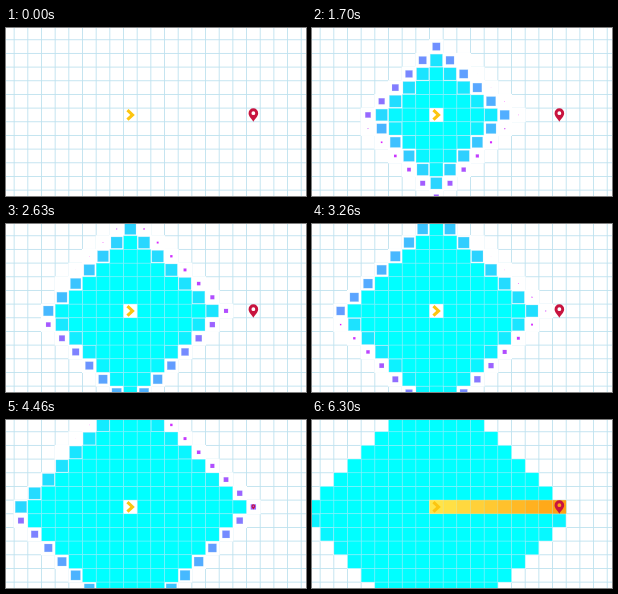
These frames come from a looping animation (300x168 px, 6330 ms). An HTML page with a canvas:

```html
<!DOCTYPE html>
<html lang="en">
<head>
<meta charset="utf-8">
<title>Breadth-first search</title>
<style>
  html, body { margin: 0; width: 100%; height: 100%; overflow: hidden; background: #fff; }
  canvas { display: block; width: 100vw; height: 100vh; }
</style>
</head>
<body>
<canvas id="stage"></canvas>
<script>
const W = 300, H = 168, LOOP = 6330;
const CELL = 13.67, LEFT = 117.5, TOP = 80.1;   // start cell's corner
const GOAL = 9;                                 // goal column, on the start row
const TICK = 31.5, GROW = 1650;
const PATH_START = 5245, PATH_STEP = 50;
const LINE = '#bfe2ef', EDGE = 'rgba(190,230,250,.5)', PATH_EDGE = 'rgba(255,235,190,.25)';
const MAGENTA = [255, 0, 255], CYAN = [0, 255, 255];
const ORANGE = [255, 157, 16], YELLOW = [255, 228, 72];

const canvas = document.getElementById('stage');
const ctx = canvas.getContext('2d');
const arrow = new Path2D('M-2.9-4.8L2.2 0L-2.9 4.8');
const pin = new Path2D('M0 6.7C-1.3 4.1-4.8 1.4-4.8-1.8A4.8 4.8 0 0 1 4.8-1.8C4.8 1.4 1.3 4.1 0 6.7Z' +
  'M1.9-1.8A1.9 1.9 0 1 0-1.9-1.8A1.9 1.9 0 1 0 1.9-1.8Z');

// Every cell the search reaches, with the time it is queued.
function search() {
  const steps = [[0, 1], [1, 0], [0, -1], [-1, 0]];
  const queue = [{ x: 0, y: 0, at: TICK }];
  const seen = new Set(['0,0']);
  for (let i = 0; i < queue.length; i++) {
    const { x, y } = queue[i];
    if (x === GOAL && y === 0) break;
    for (const [dx, dy] of steps) {
      const key = `${x + dx},${y + dy}`;
      if (seen.has(key)) continue;
      seen.add(key);
      queue.push({ x: x + dx, y: y + dy, at: (i + 1) * TICK });
    }
  }
  return queue;
}
const cells = search();

const clamp = v => Math.min(1, Math.max(0, v));
const bezier = (a, b, s) => 3 * a * s * (1 - s) ** 2 + 3 * b * s * s * (1 - s) + s ** 3;

// The CSS "ease" curve.
function ease(p) {
  if (p <= 0 || p >= 1) return clamp(p);
  let lo = 0, hi = 1;
  for (let i = 0; i < 18; i++) {
    const mid = (lo + hi) / 2;
    if (bezier(0.25, 0.25, mid) < p) lo = mid; else hi = mid;
  }
  return bezier(0.1, 1, lo);
}

const mix = (a, b, p) => `rgb(${a.map((v, i) => Math.round(v + (b[i] - v) * p)).join()})`;

function pathColor(age) {
  return age < 450
    ? mix(MAGENTA, ORANGE, (age / 450) ** 2)
    : mix(ORANGE, YELLOW, clamp((age - 580) / 450));
}

function at(x, y, scale, draw) {
  ctx.save();
  ctx.translate(LEFT + (x + 0.5) * CELL, TOP + (y + 0.5) * CELL);
  ctx.scale(scale, scale);
  draw();
  ctx.restore();
}

function tile(fill, edge) {
  ctx.fillStyle = fill;
  ctx.fillRect(-CELL / 2, -CELL / 2, CELL, CELL);
  ctx.strokeStyle = edge;
  ctx.lineWidth = 0.6;
  ctx.strokeRect(-CELL / 2, -CELL / 2, CELL, CELL);
}

function drawArrow() {
  ctx.strokeStyle = '#fcc510';
  ctx.lineWidth = 3.1;
  ctx.stroke(arrow);
}

function drawPin() {
  ctx.fillStyle = '#c8143f';
  ctx.fill(pin, 'evenodd');
}

function drawGrid() {
  ctx.fillStyle = '#fff';
  ctx.fillRect(0, 0, W, H);
  ctx.fillStyle = LINE;
  for (let x = LEFT % CELL; x < W; x += CELL) ctx.fillRect(x - 0.45, 0, 0.9, H);
  for (let y = TOP % CELL; y < H; y += CELL) ctx.fillRect(0, y - 0.45, W, 0.9);
}

function render(t) {
  drawGrid();
  const live = cells.filter(c => c.at <= t);
  const blank = CELL + 1;
  ctx.fillStyle = '#fff';
  for (const c of live) {
    at(c.x, c.y, 1, () => ctx.fillRect(-blank / 2, -blank / 2, blank, blank));
  }

  let goalScale = 1;
  for (const c of live) {
    if (c.x === 0 && c.y === 0) continue;
    const p = ease((t - c.at) / GROW);
    if (c.x === GOAL && c.y === 0) goalScale = p;
    at(c.x, c.y, p, () => tile(mix(MAGENTA, CYAN, p), EDGE));
  }
  if (live.length) at(0, 0, 1, () => tile('#fff', EDGE));

  for (let i = 0; i <= GOAL; i++) {
    const age = t - PATH_START - i * PATH_STEP;
    if (age < 0) break;
    if (i === GOAL) goalScale = 1;
    const color = pathColor(age);
    at(i, 0, 1, () => tile(color, PATH_EDGE));
  }
  at(0, 0, 1, drawArrow);
  at(GOAL, 0, goalScale, drawPin);
}

function frame() {
  const ratio = window.devicePixelRatio || 1;
  const w = Math.round(innerWidth * ratio), h = Math.round(innerHeight * ratio);
  if (canvas.width !== w || canvas.height !== h) {
    canvas.width = w;
    canvas.height = h;
  }
  ctx.setTransform(w / W, 0, 0, h / H, 0, 0);
  render((performance.now() - began) % LOOP);
  requestAnimationFrame(frame);
}
const began = performance.now();
frame();
</script>
</body>
</html>
```
